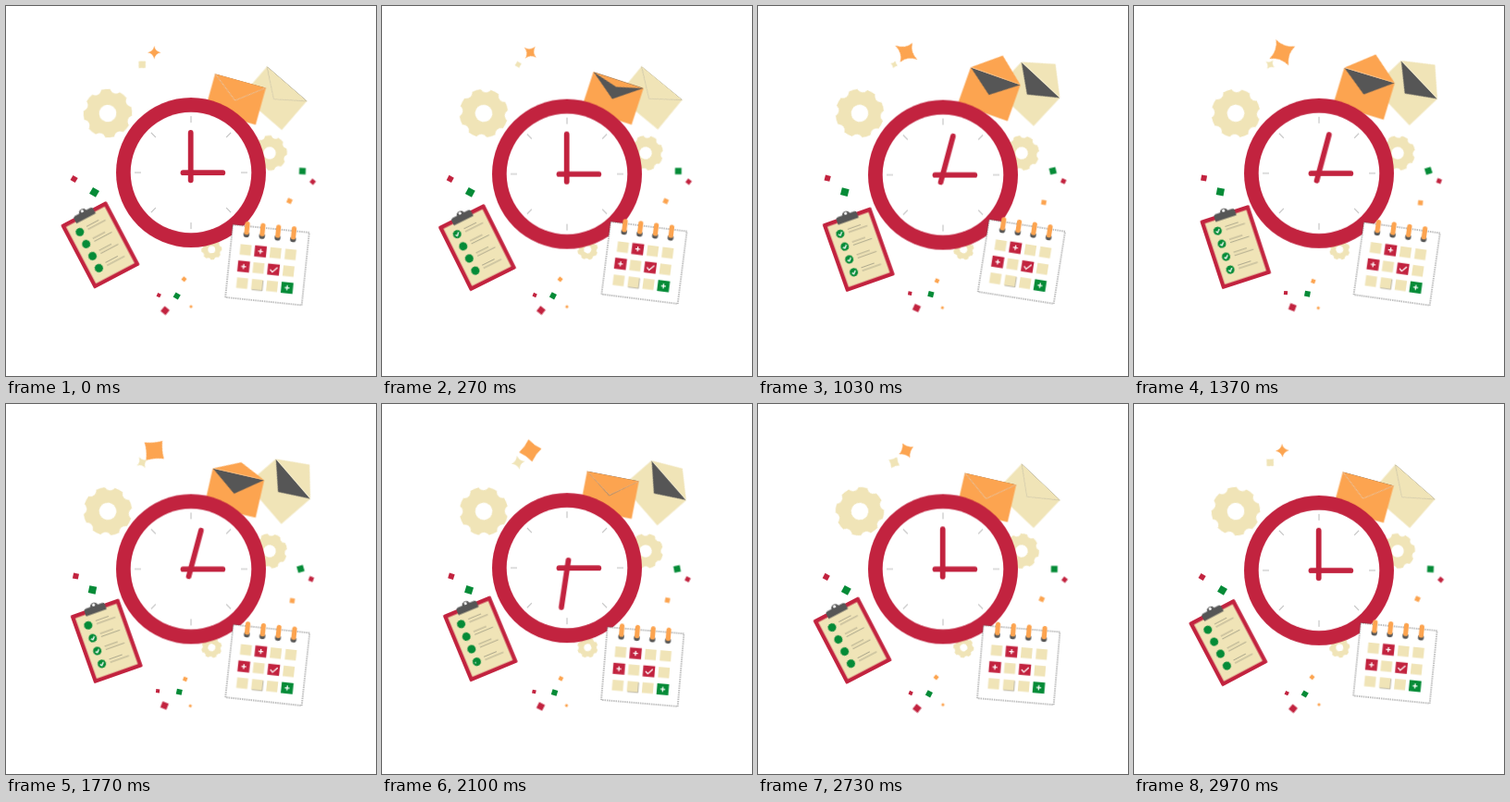
Animation, 400 px wide and 400 px high, one loop 3000 ms. Source, as an HTML page without scripts:

```html
<!DOCTYPE html>
<html lang="en">
<head>
<meta charset="utf-8">
<title>Time management</title>
<style>
html, body { margin: 0; width: 100%; height: 100%; overflow: hidden; background: #fff; }
svg { display: block; width: 100vw; height: 100vh; }
.red { fill: #c2233f; }
.green { fill: #058b37; }
.orange { fill: #fca450; }
.beige { fill: #f0e4b7; }
.dark { fill: #565656; }
.mark { fill: none; stroke: #fff; stroke-width: 1.3; }
.hand { fill: none; stroke: #c2233f; stroke-width: 5.8; stroke-linecap: round; }

/* sine motion: half a period from one extreme to the other */
.bob, .sway, .drift {
  animation: bob 1500ms cubic-bezier(.37, 0, .63, 1) var(--w, 0ms) infinite alternate;
}
.sway { animation-name: sway; }
.drift { animation-name: drift; }
@keyframes bob {
  from { transform: translateY(calc(var(--d) * -1)); }
  to { transform: translateY(var(--d)); }
}
@keyframes sway {
  from { transform: rotate(calc(var(--a) * -1)); }
  to { transform: rotate(var(--a)); }
}
@keyframes drift {
  from { transform: rotate(var(--r, 25deg)); }
  to { transform: translate(var(--x), var(--y)) rotate(calc(var(--r, 25deg) - 20deg)); }
}

.gear { animation: turn 3s linear infinite; }
@keyframes turn {
  from { transform: rotate(-5deg); }
  to { transform: rotate(355deg); }
}

.minute { animation: tick 3s ease-in-out infinite; }
@keyframes tick {
  0%, 10% { transform: rotate(0); }
  19%, 60% { transform: rotate(15deg); }
  80%, 100% { transform: rotate(360deg); }
}

.flap {
  stroke-width: 1;
  animation: flap 3s cubic-bezier(.37, 0, .63, 1) var(--start) infinite;
}
@keyframes flap {
  0%, 3% { transform: scaleY(1); stroke-opacity: 1; }
  6%, 67% { stroke-opacity: 0; }
  19%, 53% { transform: scaleY(-1.07); }
  72%, 100% { transform: scaleY(1); stroke-opacity: 1; }
}

.check {
  stroke-dasharray: 1 2;
  animation: check 3s linear calc(var(--i) * 120ms - 3s) infinite;
}
@keyframes check {
  0%, 5% { stroke-dashoffset: 1; }
  8%, 56% { stroke-dashoffset: 0; }
  58.5%, 100% { stroke-dashoffset: 1; }
}

.spark { animation: spark 3s linear infinite; }
@keyframes spark {
  0%, 22%, 100% { d: path("M0-10Q1.5-1.5 10 0Q1.5 1.5 0 10Q-1.5 1.5-10 0Q-1.5-1.5 0-10"); }
  0% { transform: rotate(0) scale(.72); }
  9% { transform: rotate(40deg) scale(.85); }
  22% { transform: rotate(88deg) scale(.9, 1.3); }
  46% {
    transform: rotate(155deg) scale(1.55);
    d: path("M0-10Q2.5-2.5 10 0Q2.5 2.5 0 10Q-2.5 2.5-10 0Q-2.5-2.5 0-10");
  }
  59%, 82% { d: path("M0-10Q4-4 10 0Q4 4 0 10Q-4 4-10 0Q-4-4 0-10"); }
  59% { transform: rotate(220deg) scale(1.38); }
  82% { transform: rotate(305deg) scale(1.05); }
  100% { transform: rotate(360deg) scale(.72); }
}
.glint { animation: glint 3s linear infinite; }
@keyframes glint {
  0%, 100% { d: path("M0-10Q5-5 10 0Q5 5 0 10Q-5 5-10 0Q-5-5 0-10"); }
  0% { transform: rotate(45deg) scale(.52); }
  9% { transform: rotate(75deg) scale(.38); }
  22% {
    transform: rotate(90deg) scale(.2);
    d: path("M0-10Q4-4 10 0Q4 4 0 10Q-4 4-10 0Q-4-4 0-10");
  }
  46%, 59% { d: path("M0-10Q1.5-1.5 10 0Q1.5 1.5 0 10Q-1.5 1.5-10 0Q-1.5-1.5 0-10"); }
  46% { transform: rotate(125deg) scale(.6); }
  59% { transform: rotate(150deg) scale(.7); }
  82% {
    transform: rotate(190deg) scale(.8);
    d: path("M0-10Q2.5-2.5 10 0Q2.5 2.5 0 10Q-2.5 2.5-10 0Q-2.5-2.5 0-10");
  }
  100% { transform: rotate(225deg) scale(.52); }
}
</style>
</head>
<body>
<svg viewBox="0 0 400 400" xmlns="http://www.w3.org/2000/svg">
  <defs>
    <g id="notch" fill="#fff">
      <circle cx="29.2" cy="0" r="6.4"/>
      <circle cx="-29.2" cy="0" r="6.4"/>
      <circle cx="0" cy="29.2" r="6.4"/>
      <circle cx="0" cy="-29.2" r="6.4"/>
    </g>
    <g id="gear">
      <circle class="beige" r="26.3"/>
      <use href="#notch" transform="rotate(22.5)"/>
      <use href="#notch" transform="rotate(67.5)"/>
      <circle r="9.3" fill="#fff"/>
    </g>
    <path id="ticks" d="M0-61V-54M0 61V54M-61 0H-54M61 0H54" fill="none" stroke="#bcbcbc"/>
    <rect id="day" class="beige" x="-6" y="-5.7" width="12" height="11.4"/>
    <rect id="mark" x="-6.4" y="-6" width="12.8" height="12"/>
    <path id="plus" class="mark" d="M-2.6 0H2.6M0-2.6V2.6"/>
    <g id="peg">
      <circle class="dark" cy="-70" r="3.2"/>
      <path d="M0-81.3V-72.3" stroke="#fca450" stroke-width="5.2" stroke-linecap="round"/>
    </g>
    <g id="item">
      <circle class="green" cx="14.9" r="4.5"/>
      <path d="M24-2H39M24 1.5H45.5" fill="none" stroke="#a9a489" stroke-width=".9"/>
    </g>
  </defs>

  <!-- gears -->
  <g transform="translate(110 116)"><g class="gear"><use href="#gear"/></g></g>
  <g transform="translate(285 159) scale(.72)"><g class="gear"><use href="#gear"/></g></g>
  <g transform="translate(222.3 263.3) scale(.42)"><g class="gear"><use href="#gear"/></g></g>

  <!-- envelopes -->
  <g transform="translate(300 128)">
    <g class="bob" style="--d:-2.5px;--w:-125ms"><g class="sway" style="--a:-5deg;--w:-1100ms">
      <g transform="translate(6.5 -46) rotate(44.3)">
        <path class="beige" d="M-28.5 0H28.5V41.5H-28.5Z"/>
        <path class="dark" d="M-28.3 0H28.3L0 21.5Z"/>
        <path class="beige flap" style="--start:-2600ms" stroke="#dfd6b4" d="M-28.5 0L0 22L28.5 0"/>
      </g>
    </g></g>
  </g>
  <g transform="translate(253.5 125)">
    <g class="bob" style="--d:-3px;--w:-125ms"><g class="sway" style="--a:4.8deg;--w:-750ms">
      <g transform="translate(0 -47) rotate(15.5)">
        <path class="orange" d="M-28.5 0H28.5V41.5H-28.5Z"/>
        <path class="dark" d="M-28.3 0H28.3L0 21.5Z"/>
        <path class="orange flap" style="--start:0ms" stroke="#f6c596" d="M-28.5 0L0 22L28.5 0"/>
      </g>
    </g></g>
  </g>

  <!-- clock -->
  <g transform="translate(200 180)">
    <g class="bob" style="--d:3px;--w:-750ms">
      <circle class="red" r="81"/>
      <circle r="65.3" fill="#fff"/>
      <use href="#ticks"/>
      <use href="#ticks" transform="rotate(45)"/>
      <path class="hand" d="M-8.5 .2H34.3"/>
      <path class="hand minute" d="M-.3 8.3V-43"/>
    </g>
  </g>

  <!-- clipboard -->
  <g transform="translate(95.4 305.4)">
    <g class="bob" style="--d:5px;--w:-790ms"><g class="sway" style="--a:4.9deg;--w:-100ms">
      <g transform="rotate(-23)">
        <rect class="red" y="-78" width="55.8" height="78" rx="1.5"/>
        <rect class="beige" x="4.3" y="-73.5" width="47.2" height="69.2"/>
        <path class="dark" d="M16-71.5V-77Q16-79.5 18.5-79.5H23.5A4.4 4.4 0 0 1 32-79.5H37Q39.5-79.5 39.5-77V-71.5Z"/>
        <circle cx="27.7" cy="-80.5" r="1.6" fill="#fff"/>
        <g transform="translate(0 -61.6)">
          <use href="#item"/>
          <path class="mark check" style="--i:0" pathLength="1" d="M12.8 0L14.4 1.7L17.2-1.4"/>
        </g>
        <g transform="translate(0 -46.9)">
          <use href="#item"/>
          <path class="mark check" style="--i:1" pathLength="1" d="M12.8 0L14.4 1.7L17.2-1.4"/>
        </g>
        <g transform="translate(0 -32.2)">
          <use href="#item"/>
          <path class="mark check" style="--i:2" pathLength="1" d="M12.8 0L14.4 1.7L17.2-1.4"/>
        </g>
        <g transform="translate(0 -17.5)">
          <use href="#item"/>
          <path class="mark check" style="--i:3" pathLength="1" d="M12.8 0L14.4 1.7L17.2-1.4"/>
        </g>
      </g>
    </g></g>
  </g>

  <!-- calendar -->
  <g transform="translate(319.7 324)">
    <g class="bob" style="--d:-3px;--w:-830ms"><g class="sway" style="--a:2.3deg;--w:-580ms">
      <g transform="rotate(6.7)">
        <rect x="-83" y="-79" width="83" height="79" fill="#fff" stroke="#555" stroke-width=".8" stroke-dasharray="1.4 1"/>
        <use href="#peg" x="-67.3"/><use href="#peg" x="-50.4"/>
        <use href="#peg" x="-33.5"/><use href="#peg" x="-16.6"/>
        <g transform="translate(-66.5 -53.3)">
          <use href="#day"/>
          <use href="#mark" class="red" x="16.2"/><use href="#plus" x="16.2"/>
          <use href="#day" x="32.5"/><use href="#day" x="48.8"/>
        </g>
        <g transform="translate(-66.8 -35.2)">
          <use href="#mark" class="red"/><use href="#plus"/>
          <use href="#day" x="16.2"/>
          <use href="#mark" class="red" x="32.5"/>
          <path class="mark" d="M28.9 .2L31.5 2.8L36.5-2.6"/>
          <use href="#day" x="48.8"/>
        </g>
        <g transform="translate(-66.5 -17.1)">
          <use href="#day"/><use href="#day" x="16.2"/>
          <path d="M11 5.9H22.3V-5" fill="none" stroke="#a39d88" stroke-width=".7"/>
          <use href="#day" x="32.5"/>
          <use href="#mark" class="green" x="48.8"/><use href="#plus" x="48.8"/>
        </g>
      </g>
    </g></g>
  </g>

  <!-- sparkles and confetti -->
  <g transform="translate(160.3 50.3)"><path class="orange spark" d="M0-10Q2-2 10 0Q2 2 0 10Q-2 2-10 0Q-2-2 0-10"/></g>
  <g transform="translate(147.2 63.3)"><path class="beige glint" d="M0-10Q5-5 10 0Q5 5 0 10Q-5 5-10 0Q-5-5 0-10"/></g>
  <g transform="translate(73.6 187)"><rect class="red drift" style="--x:2px;--y:-1px;--r:30deg" x="-3" y="-3" width="6" height="6"/></g>
  <g transform="translate(95.5 201.4)"><rect class="green drift" style="--x:-2.2px;--y:-.5px;--r:30deg" x="-4" y="-4" width="8" height="8"/></g>
  <g transform="translate(320.5 178.5)"><rect class="green drift" style="--x:-2.2px;--y:-.3px;--r:2deg" x="-3.5" y="-3.5" width="7" height="7"/></g>
  <g transform="translate(331.6 190)"><rect class="red drift" style="--x:-1.8px;--y:-.8px;--r:40deg" x="-2.5" y="-2.5" width="5" height="5"/></g>
  <g transform="translate(306.5 210.8)"><rect class="orange drift" style="--x:3.2px;--y:2px" x="-2.6" y="-2.6" width="5.2" height="5.2"/></g>
  <g transform="translate(192.5 295.3)"><rect class="orange drift" style="--x:1.3px;--y:2.3px;--r:40deg" x="-2.2" y="-2.2" width="4.4" height="4.4"/></g>
  <g transform="translate(165.2 312.7)"><rect class="red drift" style="--x:-1.2px;--y:-2.6px" x="-2" y="-2" width="4" height="4"/></g>
  <g transform="translate(184.7 313.5)"><rect class="green drift" style="--x:2.8px;--y:-2.4px;--r:30deg" x="-3" y="-3" width="6" height="6"/></g>
  <g transform="translate(172 329.3)"><rect class="red drift" style="--x:-.7px;--y:-3.6px;--r:40deg" x="-3.5" y="-3.5" width="7" height="7"/></g>
  <g transform="translate(200 325)"><rect class="orange drift" style="--x:-.8px;--y:1.5px;--r:45deg" x="-1.4" y="-1.4" width="2.8" height="2.8"/></g>
</svg>
</body>
</html>
```
